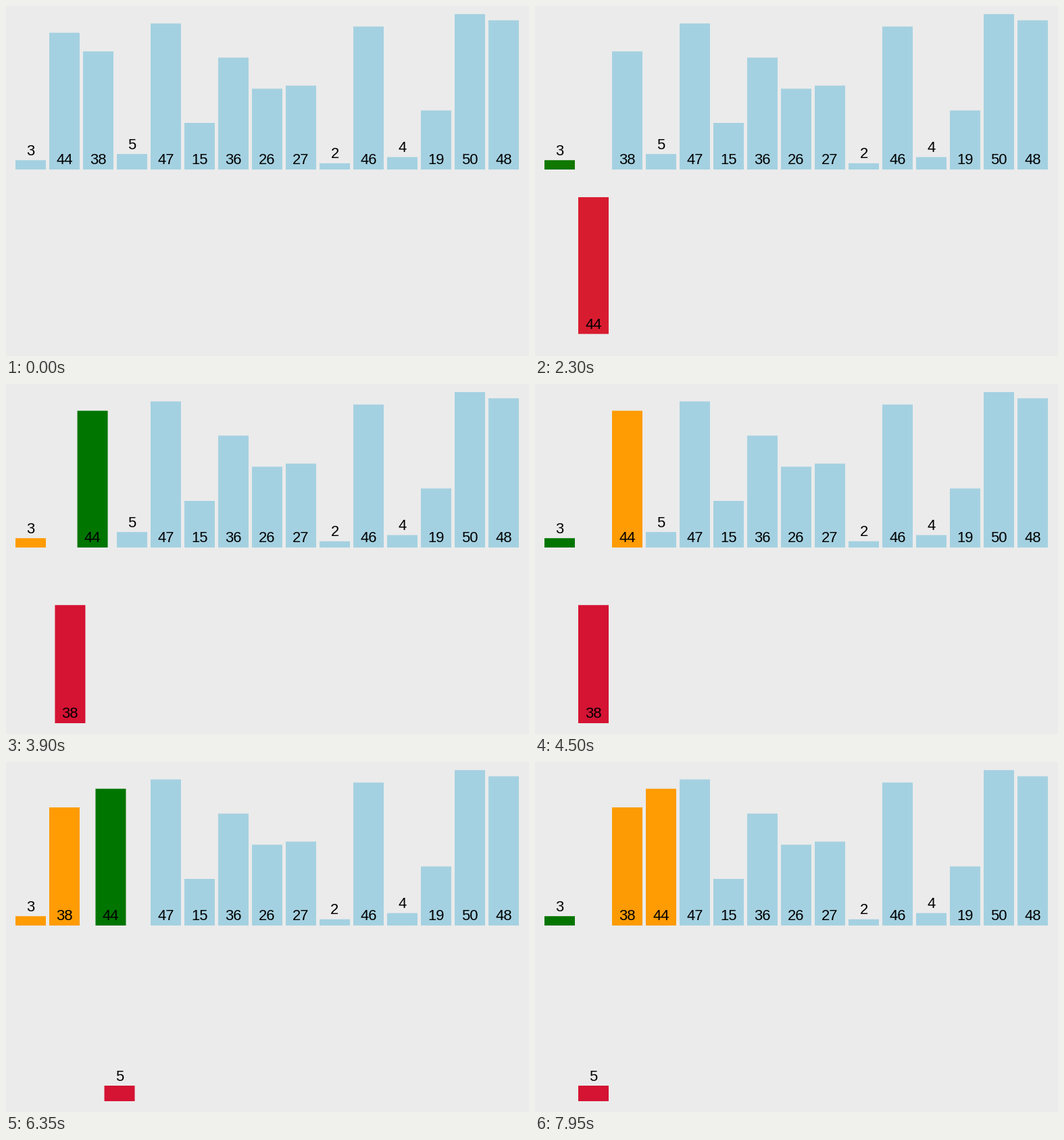
Recreate the animation shown at these times as a matplotlib script. Size 774 px wide and 518 px high, loop 8 s.

```python
import matplotlib.pyplot as plt
import numpy as np
from matplotlib.animation import FuncAnimation
from matplotlib.colors import to_rgb
from matplotlib.patches import Rectangle

W, H, DPI = 774, 518, 100
LOOP, TICK = 8000, 50
START, STEP, MOVE = 737, 500, 250  # first step, step period, transition time (ms)

VALUES = [3, 44, 38, 5, 47, 15, 36, 26, 27, 2, 46, 4, 19, 50, 48]
UNIT, BAR_W, PITCH, LEFT = 4.6, 45, 50, 14
BASE, DROP = 242, 260
LABEL_GAP = 7.5

NORMAL, SORTED, COMPARE, KEY = map(
    to_rgb, ("#A4D1E1", "#FF9B03", "#007500", "#D51333"))


def insertion_sort_states(values):
    """Return one array per step; each row is x, bottom, r, g, b of a bar."""
    n = len(values)
    order = list(range(n))
    color = [NORMAL] * n
    lowered = [False] * n
    states = []

    def push():
        rows = np.zeros((n, 5))
        for slot, bar in enumerate(order):
            rows[bar, 0] = LEFT + PITCH * slot
            rows[bar, 1] = BASE + DROP * lowered[bar]
            rows[bar, 2:] = color[bar]
        states.append(rows)

    push()
    color[0] = SORTED
    push()
    for i in range(1, n):
        key = order[i]
        color[key], lowered[key] = KEY, True
        push()
        for j in range(i - 1, -1, -1):
            other = order[j]
            color[other] = COMPARE
            push()
            done = values[other] <= values[key]
            if not done:
                order[j], order[j + 1] = key, other
                push()
            color[other] = SORTED
            if done:
                break
        color[key], lowered[key] = SORTED, False
        push()
    return states


def ease(t):
    return 4 * t**3 if t < 0.5 else 1 - 4 * (1 - t)**3


STATES = insertion_sort_states(VALUES)


def rows_at(ms):
    if ms < START:
        return STATES[0]
    k, since = divmod(ms - START, STEP)
    p = ease(min(1, since / MOVE))
    return STATES[k] * (1 - p) + STATES[k + 1] * p


fig = plt.figure(figsize=(W / DPI, H / DPI), dpi=DPI, facecolor="#EBEBEB")
ax = fig.add_axes([0, 0, 1, 1])
ax.set_xlim(0, W)
ax.set_ylim(H, 0)
ax.axis("off")

bars, labels = [], []
for v in VALUES:
    bars.append(ax.add_patch(
        Rectangle((0, 0), BAR_W, v * UNIT, linewidth=0, snap=False)))
    labels.append(ax.text(0, 0, str(v), family="Liberation Sans",
                          fontsize=22 * 72 / DPI, color="black",
                          ha="center", va="baseline", zorder=3))


def draw(frame):
    for v, bar, label, row in zip(VALUES, bars, labels, rows_at(frame * TICK)):
        x, bottom = row[:2]
        top = bottom - v * UNIT
        bar.set_xy((x, top))
        bar.set_facecolor(np.clip(row[2:], 0, 1))
        anchor = top if v < 10 else bottom
        label.set_position((x + BAR_W / 2, anchor - LABEL_GAP))
    return bars + labels


anim = FuncAnimation(fig, draw, frames=LOOP // TICK, interval=TICK,
                     init_func=lambda: draw(0), repeat=True, repeat_delay=0)
plt.show()
```
